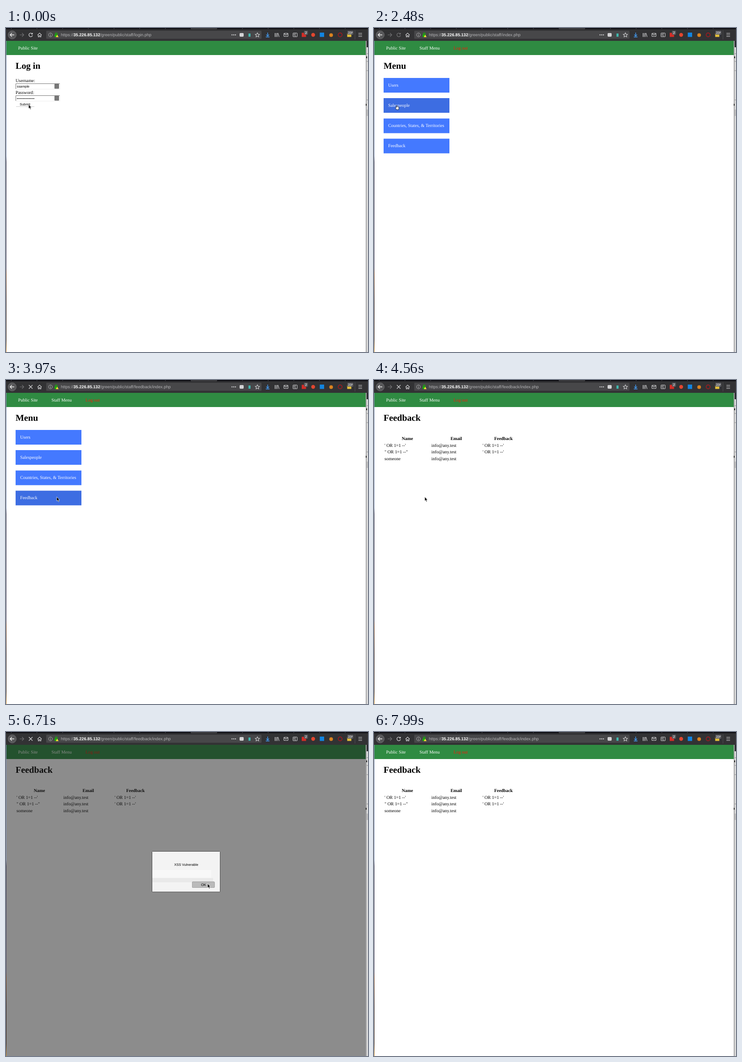
An HTML page for the animation above (8330 ms loop, 792 by 707 pixels).

```html
<!DOCTYPE html>
<html lang="en">
<head>
<meta charset="utf-8">
<title>Feedback page</title>
<style>
html, body { margin: 0; width: 100%; height: 100%; overflow: hidden; background: #fff; }
svg { display: block; width: 792px; height: 707px; }
text { font-family: "Liberation Serif", Times, serif; font-size: 9.87px; text-rendering: geometricPrecision; white-space: pre; }
.sans text { font-family: "Liberation Sans", Arial, sans-serif; font-size: 7.4px; }
.sans .url { font-size: 9.17px; fill: #b4b4b6; }
.url tspan { fill: #fff; font-weight: bold; }
.h1 { font-size: 19.7px; font-weight: bold; }
.th { font-weight: bold; text-anchor: middle; }
.white { fill: #fff; }
.line { fill: none; stroke: #d2d2d4; stroke-width: 1.1; }
.mid { text-anchor: middle; }

.anim { animation: 8330ms step-end infinite; }
.off { opacity: 0; }
#login { animation-name: login; }
#press { animation-name: press; }
#nav { animation-name: nav; }
#menu { animation-name: menu; }
#feedback { animation-name: feedback; }
#modal { animation-name: modal; }
#ghost { animation-name: ghost; }
#okDown { animation-name: okDown; }
#sales { animation-name: sales; }
#places { animation-name: places; }
#opinions { animation-name: opinions; }
#reload { animation-name: reload; }
#stop { animation-name: stop; }
#urlLogin { animation-name: urlLogin; }
#urlIndex { animation-name: urlIndex; }
#urlFeedback { animation-name: urlFeedback; }
#cursor { animation-name: move; }
#arrow { animation-name: arrow; }
#hand { animation-name: hand; }

@keyframes login { 0% { opacity: 1 } 22.8% { opacity: 0 } }
@keyframes press { 1.8% { opacity: 1 } 10.32% { opacity: 0 } }
@keyframes nav { 22.8% { opacity: 1 } }
@keyframes menu { 22.8% { opacity: 1 } 53.06% { opacity: 0 } }
@keyframes feedback { 53.06% { opacity: 1 } }
@keyframes modal { 56.9% { opacity: 1 } 82.35% { opacity: 0 } }
@keyframes ghost { 69.74% { opacity: 1 } }
@keyframes okDown { 80.55% { opacity: 1 } }
@keyframes sales { 22.8% { fill: #3d6de2 } 33.37% { fill: #4479ff } }
@keyframes places { 33.37% { fill: #3d6de2 } 35.17% { fill: #4479ff } }
@keyframes opinions { 35.17% { fill: #3d6de2 } }
@keyframes reload {
  3.6% { opacity: 0 } 22.8% { opacity: .4 } 31.57% { opacity: 1 }
  44.17% { opacity: 0 } 84.15% { opacity: .4 } 92.79% { opacity: 1 }
}
@keyframes stop { 3.6% { opacity: 1 } 22.8% { opacity: 0 } 44.17% { opacity: 1 } 84.15% { opacity: 0 } }
@keyframes urlLogin { 0% { opacity: 1 } 13.8% { opacity: 0 } }
@keyframes urlIndex { 13.8% { opacity: 1 } 45.97% { opacity: 0 } }
@keyframes urlFeedback { 45.97% { opacity: 1 } }
@keyframes arrow { 24.6% { opacity: 0 } 45.97% { opacity: 1 } }
@keyframes hand { 24.6% { opacity: 1 } 45.97% { opacity: 0 } }
@keyframes move {
  0% { transform: translate(49.5px, 167px) }
  31.57% { transform: translate(70px, 195px) }
  33.37% { transform: translate(90px, 222px) }
  35.17% { transform: translate(106px, 250px) }
  36.97% { transform: translate(111px, 255px) }
  62.3% { transform: translate(280px, 302px) }
  66.26% { transform: translate(350px, 313px) }
  68.06% { transform: translate(420px, 330px) }
  69.74% { transform: translate(441px, 331px) }
  89.19% { transform: translate(520px, 420px) }
  90.99% { transform: translate(610px, 520px) }
  92.79% { transform: translate(700px, 610px) }
  94.35% { transform: translate(770px, 688px) }
  95.91% { transform: translate(-50px, -50px) }
}
</style>
</head>
<body>
<svg viewBox="0 0 792 707" xmlns="http://www.w3.org/2000/svg">
  <defs>
    <linearGradient id="edge" x2="0" y2="1">
      <stop offset="0" stop-color="#7b8db0"/>
      <stop offset=".37" stop-color="#8797b8"/>
      <stop offset=".39" stop-color="#3c3a54"/>
      <stop offset=".73" stop-color="#55506a"/>
      <stop offset=".75" stop-color="#7a4420"/>
      <stop offset=".84" stop-color="#2c1a18"/>
      <stop offset=".96" stop-color="#3a2418"/>
      <stop offset="1" stop-color="#d08a20"/>
    </linearGradient>
    <linearGradient id="btn" x2="0" y2="1">
      <stop offset="0" stop-color="#fafafa"/>
      <stop offset=".45" stop-color="#e4e4e4"/>
      <stop offset=".5" stop-color="#d4d4d4"/>
      <stop offset="1" stop-color="#d9d9d9"/>
    </linearGradient>
  </defs>

  <rect width="792" height="707" fill="#fff"/>

  <!-- window edges -->
  <rect y="28" width="1" height="679" fill="url(#edge)"/>
  <rect x="787" y="28" width="5" height="679" fill="#d9d9d9"/>
  <rect x="787" y="28" width="2" height="679" fill="#a6a6a8"/>
  <rect x="789" y="28" width="3" height="14" fill="#2a2a2e"/>
  <path d="M789 56h3M789 73h3M789 93h3M789 157h3M789 190h3" stroke="#8a8a8a"/>
  <path d="M788 64h2M787 167.500h2" stroke="#222" stroke-width="4"/>
  <rect x="789" y="178" width="3" height="14" fill="#bdbdbd"/>

  <!-- page -->
  <rect x="1" y="28" width="786" height="31" fill="#2f8b42"/>
  <text class="white" x="26.500" y="47">Public Site</text>
  <g id="nav" class="anim off">
    <text class="white" x="99.500" y="47">Staff Menu</text>
    <text x="174" y="47" fill="#f81a0c">Log out</text>
  </g>

  <g id="login" class="anim">
    <text class="h1" x="21" y="89">Log in</text>
    <text x="21" y="117.700">Username:</text>
    <text x="21" y="143.500">Password:</text>
    <g fill="none">
      <path d="M118 121.500H21.500V133M118 147.500H21.500V159" stroke="#777"/>
      <path d="M22 133.500h96v-12M22 159.500h96v-12" stroke="#eee"/>
      <path d="M25 154h36" stroke="#000" stroke-width="2" stroke-linecap="round" stroke-dasharray="0 3.250"/>
    </g>
    <rect x="106" y="122" width="10" height="10.500" rx="1" fill="#777"/>
    <rect x="106" y="148" width="10" height="10.500" rx="1" fill="#777"/>
    <path d="M22 171.500h40" stroke="#ccc"/>
    <rect id="press" class="anim off" x="21" y="161" width="41" height="10.500" rx="2" fill="#d4d4d6"/>
    <g class="sans">
      <text x="23.700" y="130">ssample</text>
      <text x="30" y="169">Submit</text>
    </g>
  </g>

  <g id="menu" class="anim off">
    <text class="h1" x="21" y="89">Menu</text>
    <g fill="#4479ff">
      <rect x="21" y="109" width="144" height="32"/>
      <rect id="sales" class="anim" x="21" y="153" width="144" height="32"/>
      <rect id="places" class="anim" x="21" y="197.500" width="144" height="32"/>
      <rect id="opinions" class="anim" x="21" y="241.500" width="144" height="32"/>
    </g>
    <g class="white">
      <text x="31" y="127.700">Users</text>
      <text x="31" y="171.700">Salespeople</text>
      <text x="31" y="215.700">Countries, States, &amp; Territories</text>
      <text x="31" y="259.700">Feedback</text>
    </g>
  </g>

  <g id="feedback" class="anim off">
    <text class="h1" x="21" y="89">Feedback</text>
    <text class="th" x="73" y="131.300">Name</text>
    <text class="th" x="180" y="131.300">Email</text>
    <text class="th" x="283.300" y="131.300">Feedback</text>
    <text x="23" y="145.700">' OR 1=1 --'</text>
    <text x="125.500" y="145.700">info@any.test</text>
    <text x="237.500" y="145.700">' OR 1=1 --'</text>
    <text x="23" y="160">" OR 1=1 --"</text>
    <text x="125.500" y="160">info@any.test</text>
    <text x="237.500" y="160">' OR 1=1 --'</text>
    <text x="23" y="174.500">someone</text>
    <text x="125.500" y="174.500">info@any.test</text>
  </g>

  <g id="modal" class="anim off sans">
    <rect x="1" y="28" width="786" height="679" fill="#1a1a1a" fill-opacity=".5"/>
    <rect x="319.500" y="260.500" width="149" height="88.500" rx="1" fill="#f3f3f3" stroke="#4a4a4a"/>
    <g id="ghost" class="anim off">
      <rect x="320" y="301" width="129" height="17.500" fill="#f8f8f8"/>
      <rect x="320" y="318.500" width="133" height="9.500" fill="#e9e9e9"/>
    </g>
    <text class="mid" x="394.300" y="291.700" style="font-size:7.5px">XSS Vulnerable</text>
    <rect x="407.500" y="327" width="48.500" height="12.500" rx="1" fill="url(#btn)" stroke="#9a9a9a"/>
    <rect id="okDown" class="anim off" x="407.500" y="327" width="48.500" height="12.500" rx="1" fill="#bababa" stroke="#a4a4a4"/>
    <text class="mid" x="432.300" y="335.500" style="font-size:7.700px">OK</text>
  </g>

  <!-- browser toolbar -->
  <rect width="792" height="28" fill="#323234"/>
  <rect width="792" height="2.500" fill="#0d0d12"/>
  <rect x="405" width="56" height="3" fill="#38383b"/>
  <path d="M11 1H792" stroke="#4a4a50" stroke-width="2" stroke-dasharray="1 55.200"/>
  <rect x="88" y="6" width="471" height="17.500" rx="1.500" fill="#474749"/>
  <circle cx="13.500" cy="15" r="9" fill="#58585a" stroke="#727274" stroke-width=".8"/>
  <g class="line">
    <path d="M18 15H9.500M13 11l-4 4 4 4" stroke="#f0f0f0" stroke-width="1.300"/>
    <path d="M30 15h8.500M35 11l4 4-4 4" stroke="#737375"/>
    <path d="M69 15.500l4.500-4.500 4.500 4.500M70.500 15v4.500h2v-3h2v3h2V15"/>
    <circle cx="97.300" cy="15" r="4.200" stroke="#b4b4b6" stroke-width=".9"/>
    <path d="M97.300 14.500v3M97.300 12.300v1" stroke="#b4b4b6"/>
    <path d="M108 15v-2a2 2 0 0 1 4 0v2" stroke="#12bc00" stroke-width="1.300"/>
    <path d="M550 10.500l1.400 3 3.300.4-2.400 2.200.6 3.300-2.900-1.600-2.900 1.600.6-3.300-2.400-2.200 3.300-.4z"/>
    <path d="M572.500 10v7M569.500 14.500l3 3 3-3M568.500 19.500h8" stroke="#45a1ff" stroke-width="1.300"/>
    <path d="M588.500 11v8.500M591 11v8.500M593.500 11v8.500M595 11l2.500 8.500"/>
    <rect x="608" y="11.500" width="9" height="7" rx="1"/>
    <path d="M608.500 12.500l4 3 4-3"/>
    <rect x="628" y="11" width="9" height="8" rx="1"/>
    <path d="M632.500 11v8M629.500 13.500h1.500M629.500 15.500h1.500"/>
    <path d="M771 11.500h8M771 15h8M771 18.500h8"/>
    <path d="M763.500 5v20" stroke="#4c4c4f"/>
    <circle cx="731" cy="15" r="4.300" stroke="#b3181d" stroke-width="1.400"/>
    <g id="reload" class="anim">
      <path d="M57.200 12.500a4 4 0 1 0 .8 3.500" stroke-width="1.300"/>
      <path d="M58.500 10v4h-4z" fill="#d2d2d4" stroke="none"/>
    </g>
    <path id="stop" class="anim off" d="M50 11l8 8M58 11l-8 8" stroke-width="1.300"/>
  </g>
  <rect x="106.500" y="14.500" width="6" height="5" rx=".6" fill="#12bc00"/>
  <path d="M112 14.500l3 5.500h-6z" fill="#ffd83a"/>
  <g fill="#d2d2d4">
    <circle cx="494.500" cy="15" r="1.200"/>
    <circle cx="498.300" cy="15" r="1.200"/>
    <circle cx="502" cy="15" r="1.200"/>
    <rect x="511" y="11" width="9" height="8" rx="2"/>
  </g>
  <rect x="530.500" y="12" width="4.500" height="7" fill="#3fb8ae"/>
  <rect x="647" y="10.500" width="9.500" height="9" fill="#d32d27"/>
  <circle cx="672" cy="15" r="4.200" fill="#e2472f"/>
  <rect x="686.500" y="10" width="9.500" height="9.500" fill="#1284e0"/>
  <circle cx="711.300" cy="15.500" r="4" fill="#d9821f"/>
  <rect x="746.500" y="11.500" width="9" height="8" fill="#e6c23a"/>
  <rect x="652" y="6" width="8.500" height="8.500" rx="1" fill="#5c5c60"/>
  <rect x="747" y="6" width="13" height="8.500" rx="1" fill="#5c5c60"/>
  <g class="sans white">
    <text class="mid" x="656.300" y="12.700">2</text>
    <text class="mid" x="753.500" y="12.700" style="font-size:6.800px">23*</text>
    <text class="url" x="120" y="18.400">https://<tspan>35.226.85.132</tspan>/green/public/staff/</text>
    <text id="urlLogin" class="url anim" x="281" y="18.400">login.php</text>
    <text id="urlIndex" class="url anim off" x="281" y="18.400">index.php</text>
    <text id="urlFeedback" class="url anim off" x="281" y="18.400">feedback/index.php</text>
  </g>

  <g id="cursor" class="anim" stroke-linejoin="round">
    <path id="arrow" class="anim" d="M0 0v9l2-1.800 1.500 3.500 1.600-.7-1.500-3.300h2.700z" fill="#000" stroke="#fff" stroke-width=".7"/>
    <path id="hand" class="anim off" d="M-.5 6.500V2.300q.7-1 1.400 0v2.500q.8-.8 1.400.2.900-.6 1.400.3 1-.3 1.200.7v2.500l-.8 2.700H-.2l-2.500-4q.6-1.300 2.200-.7z" fill="#fff" stroke="#000" stroke-width=".8"/>
  </g>
</svg>
</body>
</html>
```
